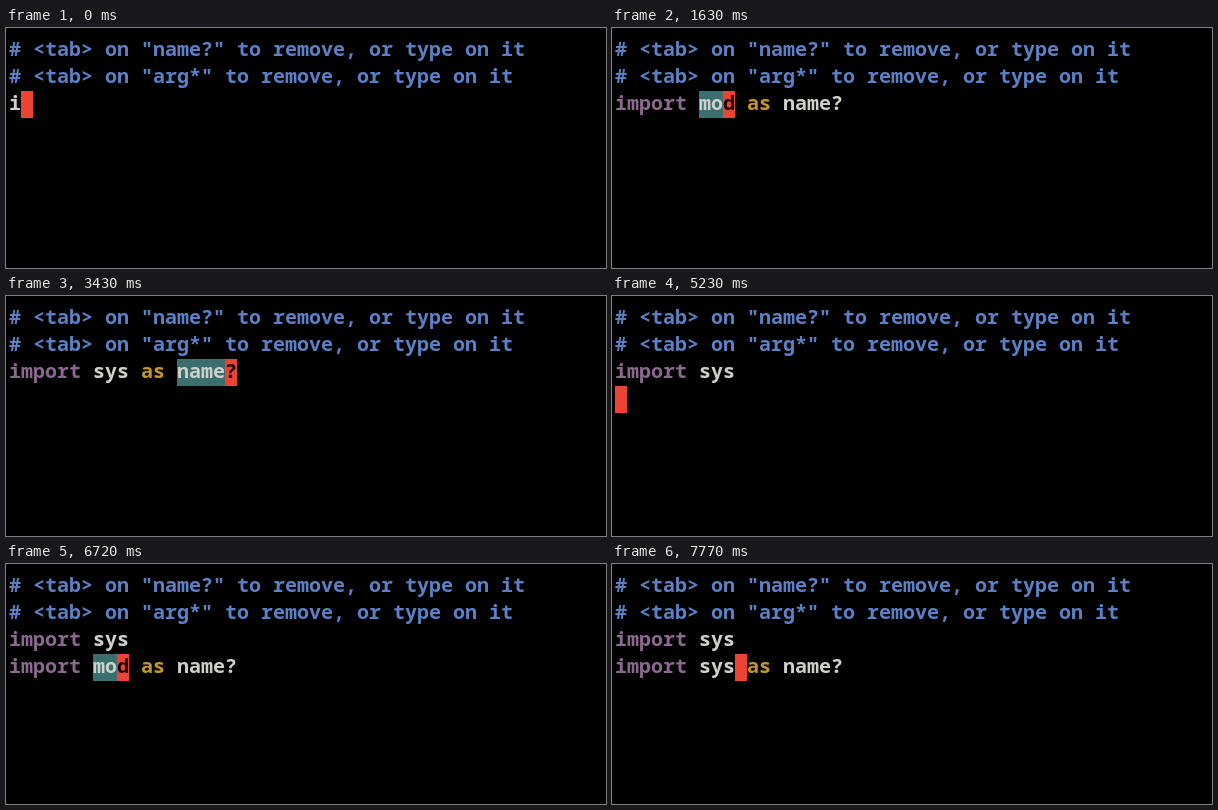
These frames come from a looping animation (600 px wide and 240 px high, 8000 ms). An HTML page:

```html
<!DOCTYPE html>
<html lang="en">
<head>
<meta charset="utf-8">
<title>Snippet expansion</title>
<style>
  html, body { margin: 0; width: 100%; height: 100%; overflow: hidden; background: #000; }
  #stage { position: relative; width: 600px; height: 240px; overflow: hidden; }
  .row, .fill { position: absolute; height: 27px; }
  .row {
    left: 3px; white-space: pre; color: #cfd0c8;
    font: 600 20px/27px "Noto Sans Mono", "DejaVu Sans Mono", monospace;
  }
  .comment { color: #5c80c5; }
  .keyword { color: #8b698f; }
  .as { color: #c6962b; }
  .under { color: #1a0806; }
  #region { background: #3a6e6f; }
  #cursor { background: #ec4335; }
</style>
</head>
<body>
<div id="stage">
  <div class="fill" id="region"></div>
  <div class="fill" id="cursor"></div>
  <div class="row comment" style="top:7px"># &lt;tab&gt; on "name?" to remove, or type on it</div>
  <div class="row comment" style="top:34px"># &lt;tab&gt; on "arg*" to remove, or type on it</div>
  <div class="row" id="first" style="top:61px"></div>
  <div class="row" id="second" style="top:88px"></div>
</div>
<script>
const LOOP = 8000, CELL = 12, LEFT = 3, TOPS = [63, 90];
const get = id => document.getElementById(id);
const rows = [get("first"), get("second")];
const DONE = "import sys";

// [start ms, row, text, cursor column (-1 = blinked off), region start, region end]
const steps = [
  [0, 0, "i", 1],
  [590, 0, "im", 2],
  [890, 0, "imp", 3],
  [1480, 0, "imp", -1],
  [1630, 0, "import mod as name?", 9, 7, 10],
  [2080, 0, "import s as name?", 8],
  [2230, 0, "import sys as name?", 10],
  [3430, 0, "import sys as name?", 18, 14, 19],
  [4330, 0, DONE, 10],
  [5230, 1, "", 0],
  [5680, 1, "i", 1],
  [5820, 1, "im", 2],
  [6120, 1, "imp", 3],
  [6720, 1, "import mod as name?", 9, 7, 10],
  [7310, 1, "import mod as name?", -1, 7, 10],
  [7460, 1, "import s as name?", 8],
  [7610, 1, "import sy as name?", 9],
  [7770, 1, "import sys as name?", 10],
];

function write(el, text, cursor) {
  let col = 0;
  el.replaceChildren();
  const add = (str, cls) => {
    if (!str) return;
    const span = document.createElement("span");
    span.className = cls;
    span.textContent = str;
    el.append(span);
  };
  for (const word of text.split(/(\s+)/)) {
    const cls = word === "import" ? "keyword" : word === "as" ? "as" : "";
    const at = cursor - col;
    if (at >= 0 && at < word.length) {
      add(word.slice(0, at), cls);
      add(word[at], "under");
      add(word.slice(at + 1), cls);
    } else add(word, cls);
    col += word.length;
  }
}

function fill(id, row, from, to) {
  Object.assign(get(id).style, {
    left: LEFT + from * CELL + "px",
    top: TOPS[row] + "px",
    width: (to - from) * CELL + "px",
  });
}

function show([, row, text, cursor, from = 0, to = 0]) {
  write(rows[row], text, cursor);
  write(rows[1 - row], row ? DONE : "", -1);
  fill("region", row, from, to);
  fill("cursor", row, cursor, cursor < 0 ? cursor : cursor + 1);
}

const start = performance.now();
let shown;
function tick() {
  const time = (performance.now() - start) % LOOP;
  const step = steps.findLast(s => s[0] <= time) || steps[0];
  if (step !== shown) show(shown = step);
  requestAnimationFrame(tick);
}
tick();
</script>
</body>
</html>
```
